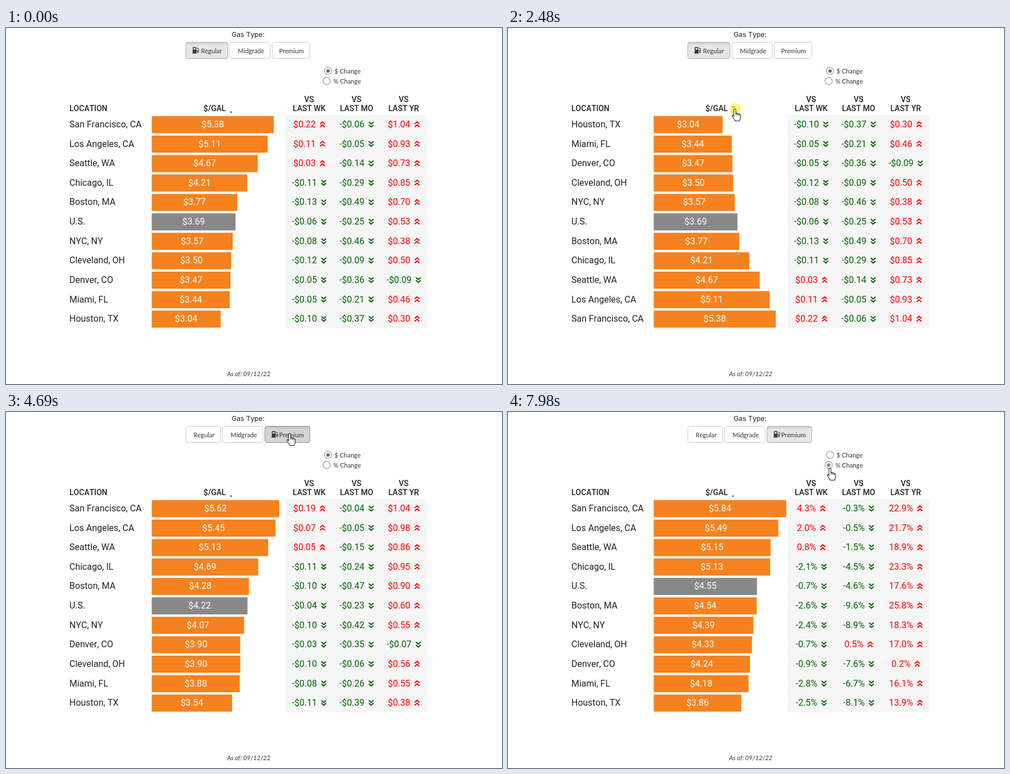
Animation of 884 by 634 pixels, one loop 8 s. Source, as an HTML page with a canvas:

```html
<!DOCTYPE html>
<html lang="en">
<head>
<meta charset="utf-8">
<title>Gas prices by location</title>
<style>
  html, body { margin: 0; width: 100%; height: 100%; overflow: hidden; background: #fff; }
  canvas { display: block; }
</style>
</head>
<body>
<canvas id="stage" width="884" height="634"></canvas>
<script>
const ctx = document.getElementById('stage').getContext('2d');
ctx.fontKerning = 'none';
const LOOP = 8000;
const TABLE = '16px Roboto, sans-serif';
const HEADER = '500 14px Roboto, sans-serif';
const LABEL = '11.2px Lato, sans-serif';
const RED = [255, 0, 0], GREEN = [0, 100, 0];
const ROW = 34.62, BAR_LEFT = 259.7, BAR_SCALE = 40.45;

// Each row: location | price, change vs last week, month, year
const parse = text => text.trim().split('\n').map(line => {
  const [place, numbers] = line.split('|');
  const [price, ...changes] = numbers.trim().split(' ').map(Number);
  return { place: place.trim(), price, changes };
});

const regular = parse(`
San Francisco, CA | 5.38 .22 -.06 1.04
Los Angeles, CA | 5.11 .11 -.05 .93
Seattle, WA | 4.67 .03 -.14 .73
Chicago, IL | 4.21 -.11 -.29 .85
Boston, MA | 3.77 -.13 -.49 .70
U.S. | 3.69 -.06 -.25 .53
NYC, NY | 3.57 -.08 -.46 .38
Cleveland, OH | 3.50 -.12 -.09 .50
Denver, CO | 3.47 -.05 -.36 -.09
Miami, FL | 3.44 -.05 -.21 .46
Houston, TX | 3.04 -.10 -.37 .30`);

const midgrade = parse(`
San Francisco, CA | 5.62 .19 -.04 1.04
Los Angeles, CA | 5.45 .07 -.05 .98
Seattle, WA | 5.13 .05 -.15 .86
Chicago, IL | 4.69 -.11 -.24 .95
Boston, MA | 4.28 -.10 -.47 .90
U.S. | 4.22 -.04 -.23 .60
NYC, NY | 4.07 -.10 -.42 .55
Denver, CO | 3.90 -.03 -.35 -.07
Cleveland, OH | 3.90 -.10 -.06 .56
Miami, FL | 3.88 -.08 -.26 .55
Houston, TX | 3.54 -.11 -.39 .38`);

const premium = parse(`
San Francisco, CA | 5.84 .24 -.02 1.09
Los Angeles, CA | 5.49 .11 -.03 .98
Seattle, WA | 5.15 .04 -.08 .82
Chicago, IL | 5.13 -.11 -.24 .97
U.S. | 4.55 -.03 -.22 .68
Boston, MA | 4.54 -.12 -.48 .93
NYC, NY | 4.39 -.11 -.43 .68
Cleveland, OH | 4.33 -.03 .02 .63
Denver, CO | 4.24 -.04 -.35 .01
Miami, FL | 4.18 -.12 -.30 .58
Houston, TX | 3.86 -.10 -.34 .47`);

const ascending = [...regular].reverse();
const SORT_UP = 1640, SORT_DOWN = 2550;

const CURSOR = [
  [730, 795, 238], [1290, 404.5, 144], [2550, 404.5, 144], [2970, 417, 137],
  [3250, 450, 48], [3390, 447, 44], [3950, 447, 44], [4070, 486.5, 40],
  [4350, 505.5, 38], [5490, 505.5, 38], [6180, 617, 99], [6600, 617, 99],
  [7160, 574, 98], [7800, 574, 98], [7850, 574, 100]
];
const CLICKS = [[1490, 1640], [2480, 2550], [3530, 3600], [4620, 4690], [6530, 6600]];

const HAND = new Path2D('M-2 13V1.8a1.8 1.8 0 0 1 3.6 0V8c1-1 3-.6 3 .8 1-.8 2.8-.4 2.9 1 ' +
  '1.1-.6 2.4 0 2.4 1.4V16c0 2-1.6 3-1.6 5.5H.2c0-2-4.6-6-5.2-9 0-1.6 2-1.6 3 .5Z');
const PUMP = new Path2D('M.8 10.2V1.2Q.8 0 2 0H6Q7.2 0 7.2 1.2V10.2H8V11.6H0V10.2ZM2.2 1.5V4.6H5.8V1.5Z');
const HOSE = new Path2D('M7 6.2H8.2Q9 6.2 9 7V8.6Q9 9.6 10 9.6T11 8.6V3.6L8.8 1.4');

const clamp = v => Math.max(0, Math.min(1, v));
const smooth = v => v * v * (3 - 2 * v);
const mix = (a, b, k) => a + (b - a) * k;

function text(str, x, y, font, color = '#222', align = 'left') {
  ctx.font = font;
  ctx.fillStyle = color;
  ctx.textAlign = align;
  ctx.fillText(str, x, y);
}

function line(points, color, width) {
  ctx.beginPath();
  points.forEach(([x, y]) => ctx.lineTo(x, y));
  ctx.strokeStyle = color;
  ctx.lineWidth = width;
  ctx.stroke();
}

function circle(x, y, r, fill, stroke) {
  ctx.beginPath();
  ctx.arc(x, y, r, 0, 2 * Math.PI);
  if (fill) { ctx.fillStyle = fill; ctx.fill(); }
  if (stroke) { ctx.strokeStyle = stroke; ctx.lineWidth = 1.5; ctx.stroke(); }
}

function cursorAt(t) {
  if (t < CURSOR[0][0]) return null;
  const next = CURSOR.findIndex(key => key[0] > t);
  if (next < 0) return CURSOR.at(-1).slice(1);
  const [t0, x0, y0] = CURSOR[next - 1], [t1, x1, y1] = CURSOR[next];
  const k = smooth((t - t0) / (t1 - t0));
  return [mix(x0, x1, k), mix(y0, y1, k)];
}

// Rows on show, the rows they replace and the time of the re-sort
function tableAt(t) {
  if (t >= 5020) return { rows: premium };
  if (t >= 4000) return { rows: midgrade };
  if (t >= SORT_DOWN) return { rows: regular, old: ascending, since: SORT_DOWN };
  if (t >= SORT_UP) return { rows: ascending, old: regular, since: SORT_UP };
  return { rows: regular };
}

function drawButtons(t, pointer) {
  const selected = t < 3600 ? 0 : t < 4690 ? 1 : 2;
  const focused = t >= 3600 && t < 6530;
  let x = 320.5;
  [['Regular', 62], ['Midgrade', 72], ['Premium', 67]].forEach(([name, base], i) => {
    const active = i === selected;
    const w = base + (active ? 13 : 0);
    const hover = pointer && pointer[0] > x && pointer[0] < x + w && pointer[1] > 25 && pointer[1] < 55;
    const dark = active && focused;
    ctx.beginPath();
    ctx.roundRect(x, 25.5, w, 29, 3.5);
    ctx.fillStyle = dark ? '#d4d4d4' : active || hover ? '#e6e6e6' : '#fff';
    ctx.fill();
    if (active) {
      const shade = ctx.createLinearGradient(0, 25, 0, 31);
      shade.addColorStop(0, 'rgba(0,0,0,.13)');
      shade.addColorStop(1, 'rgba(0,0,0,0)');
      ctx.fillStyle = shade;
      ctx.fill();
    }
    ctx.strokeStyle = dark ? '#8c8c8c' : active || hover ? '#adadad' : '#ccc';
    ctx.lineWidth = 1;
    ctx.stroke();
    text(name, x + w - 10.8, 44.5, LABEL, '#333', 'right');
    if (active) {
      ctx.save();
      ctx.translate(x + 11.5, 34);
      ctx.fill(PUMP, 'evenodd');
      ctx.strokeStyle = '#333';
      ctx.lineWidth = 1.2;
      ctx.stroke(HOSE);
      ctx.restore();
    }
    x += w + 3.5;
  });
}

function drawRadios(percent) {
  circle(574, 76.5, 6.4, '#fff', '#aaa');
  circle(571.5, 94.5, 6.4, '#fff', '#aaa');
  if (percent) circle(571.5, 94.5, 3.1, '#5da562');
  else circle(574, 76.5, 3.1, '#557a62');
  text('$ Change', 585.5, 80.5, LABEL, '#333');
  text('% Change', 583.5, 98.5, LABEL, '#333');
}

function drawHeader(up) {
  text('LOCATION', 113, 148, HEADER);
  text('$/GAL', 352, 148, HEADER);
  line(up ? [[399, 142], [401, 140], [403, 142]] : [[399.5, 149], [401, 150.5], [402.5, 149]], '#222', 1.1);
  [['WK', 540.3], ['MO', 624.8], ['YR', 708.8]].forEach(([span, x]) => {
    text('VS', x, 131.5, HEADER, '#222', 'center');
    text('LAST ' + span, x, 148, HEADER, '#222', 'center');
  });
}

function drawChange(change, price, cx, y, percent, iconColor) {
  const sign = change < 0 ? '-' : '';
  const label = percent
    ? sign + Math.abs(100 * change / (price - change)).toFixed(1) + '%'
    : sign + '$' + Math.abs(change).toFixed(2);
  ctx.font = TABLE;
  const w = ctx.measureText(label).width;
  const x = cx - (w + 17) / 2;
  text(label, x, y, TABLE, `rgb(${change < 0 ? GREEN : RED})`);
  const left = x + w + 7.8, dir = change < 0 ? 1 : -1;
  for (const mid of [-7.9, -2.7])
    line([[left, y + mid - 1.9 * dir], [left + 4.2, y + mid + 1.9 * dir], [left + 8.4, y + mid - 1.9 * dir]], iconColor, 2);
}

function drawTable(t, percent) {
  const { rows, old = rows, since = 0 } = tableAt(t);
  const slide = smooth(clamp((t - since) / 400));
  const fade = clamp((t - since) / 600);
  ctx.fillStyle = '#f6f6f6';
  ctx.fillRect(498, 155, 253, 380);
  rows.forEach((row, i) => {
    const y = 177 + i * ROW;
    const w = BAR_SCALE * mix(old[i].price, row.price, slide);
    text(row.place, 113, y, TABLE);
    ctx.fillStyle = row.place === 'U.S.' ? '#888' : '#f5821f';
    ctx.fillRect(BAR_LEFT, y - 20, w, 30.4);
    text('$' + row.price.toFixed(2), BAR_LEFT + w / 2, y, TABLE, '#fff', 'center');
    row.changes.forEach((change, c) => {
      const from = old[i].changes[c] < 0 ? GREEN : RED, to = change < 0 ? GREEN : RED;
      const color = `rgb(${from.map((v, k) => Math.round(mix(v, to[k], fade)))})`;
      drawChange(change, row.price, [540.5, 625, 709][c], y, percent, color);
    });
  });
}

function drawCursor(t, [x, y]) {
  if (CLICKS.some(([start, end]) => t >= start && t < end)) circle(x, y, 10.5, 'rgba(255,238,0,.52)');
  ctx.save();
  ctx.translate(x, y);
  ctx.fillStyle = '#fff';
  ctx.fill(HAND);
  ctx.strokeStyle = '#222';
  ctx.lineWidth = 1.1;
  ctx.stroke(HAND);
  line([[2, 8], [2, 11.5]], '#222', 1);
  line([[4.8, 9], [4.8, 12]], '#222', 1);
  line([[7.5, 10], [7.5, 12.5]], '#222', 1);
  ctx.restore();
}

function draw(t) {
  const pointer = cursorAt(t);
  ctx.fillStyle = '#fff';
  ctx.fillRect(0, 0, 884, 634);
  text('Gas Type:', 431.5, 16, '12.3px Inter, sans-serif', '#222', 'center');
  drawButtons(t, pointer);
  drawRadios(t >= 6600);
  drawTable(t, t >= 6880);
  drawHeader(t >= SORT_UP && t < SORT_DOWN);
  text('As of: 09/12/22', 432.5, 620, 'italic ' + LABEL, '#333', 'center');
  if (pointer) drawCursor(t, pointer);
}

const start = performance.now();
function tick() {
  draw((performance.now() - start) % LOOP);
  requestAnimationFrame(tick);
}
tick();
</script>
</body>
</html>
```
